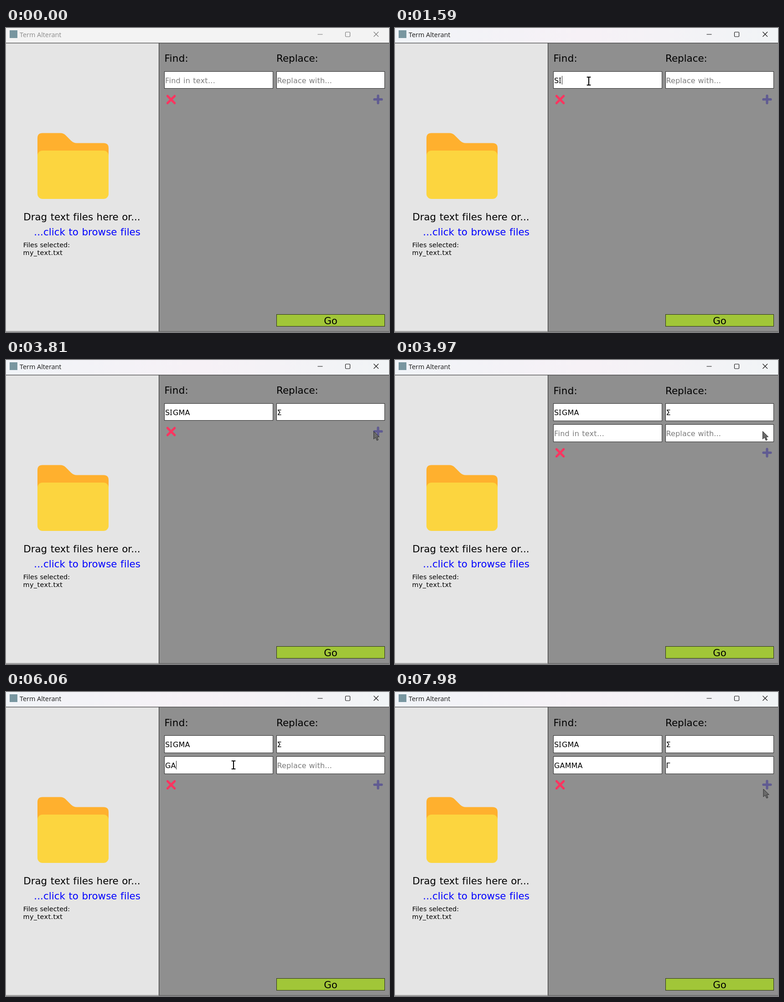
Write an HTML page that moves like this. It is 840 by 667 pixels and loops after 8000 ms.

```html
<!DOCTYPE html>
<html lang="en">
<head>
<meta charset="utf-8">
<title>Term Alterant</title>
<style>
  html, body { margin: 0; width: 100%; height: 100%; overflow: hidden; background: #8f8f8f; }
  svg { display: block; width: 100%; height: 100%; }
  text { font-family: "DejaVu Sans", Verdana, sans-serif; white-space: pre; font-variant-ligatures: none; }
  .big { font-size: 21.4px; word-spacing: .7px; }
  .small { font-size: 14.4px; word-spacing: .5px; }
  .field text { font-size: 16px; word-spacing: .55px; letter-spacing: .1px; }
  .field rect { fill: #fff; stroke: #2c2c2c; }
  .field .hint { fill: #7b7b7b; letter-spacing: .3px; }
  .field.right .hint { letter-spacing: .15px; }
  .serif { font-family: "Noto Sans", sans-serif; letter-spacing: 1.3px; }
  .caption { font: 14.4px "Open Sans", sans-serif; fill: #8a8a8a; }
  .controls { fill: none; stroke: #777; stroke-width: 1.1; }
  #tint { visibility: hidden; }
  .active #tint { visibility: visible; }
  .active .caption { fill: #181818; }
  .active .controls { stroke: #111; }
</style>
</head>
<body>
<svg id="app" viewBox="0 0 840 667" xmlns="http://www.w3.org/2000/svg">
  <defs>
    <linearGradient id="bar">
      <stop offset="0" stop-color="#f1f4f8"/>
      <stop offset=".5" stop-color="#f6f1f6"/>
      <stop offset="1" stop-color="#f1f4f6"/>
    </linearGradient>
  </defs>

  <!-- title bar -->
  <rect width="840" height="33" fill="#f3f3f3"/>
  <rect id="tint" width="840" height="33" fill="url(#bar)"/>
  <rect x="8" y="5" width="17" height="17" fill="#7896a0"/>
  <text class="caption" x="30" y="20">Term Alterant</text>
  <g class="controls">
    <path d="M683.5 14H694.5M806.5 8.500L817 19M817 8.500L806.5 19"/>
    <rect x="744.500" y="9" width="10" height="10" rx="1.500"/>
  </g>

  <!-- panels -->
  <rect y="33" width="335" height="634" fill="#e5e5e5"/>
  <rect x="336" y="33" width="504" height="634" fill="#8f8f8f"/>
  <path d="M0 33H840M335.5 33V666" stroke="#1c1c1c"/>
  <path d="M0 665.8H840" stroke="#555"/>

  <!-- file drop area -->
  <path fill="#ffb02e" d="M69 300V241.500Q69 230.500 80 230.500H119Q126 230.500 131 235.500L143 247.500Q148.500 252.500 155 252.500H214Q225 252.500 225 263.500V300Z"/>
  <rect x="69" y="269" width="156" height="106" rx="11" fill="#fcd53f"/>
  <text class="big" x="38.200" y="421.500">Drag text files here or...</text>
  <text class="big" x="295" y="454.500" text-anchor="end" fill="#00f" letter-spacing=".04">...click to browse files</text>
  <text class="small" x="37.800" y="481">Files selected:</text>
  <text class="small" x="37.500" y="498" letter-spacing=".4">my_text.txt</text>

  <!-- form -->
  <g id="heads">
    <text class="big" x="347.500" y="74.300" letter-spacing=".3">Find:</text>
    <text class="big" x="593" y="74.300">Replace:</text>
  </g>
  <g id="fields"></g>
  <g id="tools" fill="none" stroke-linecap="round">
    <path stroke="#fa3560" stroke-width="5" d="M354.300 149.200L369.900 164.800M369.900 149.200L354.300 164.800"/>
    <path stroke="#605b92" stroke-width="5.200" d="M808 156.700H824M816 148.700V164.700"/>
  </g>
  <rect x="593.500" y="628.500" width="237" height="26" fill="#a1c638" stroke="#2b3212"/>
  <text class="big" x="712" y="649.500" text-anchor="middle">Go</text>

  <rect id="caret" width="1" height="19" fill="#222"/>
  <path id="arrow" d="M0 0V17L4 13.300L7 20L10 18.700L7.200 12.200H12.300Z" fill="#6a6a6a" stroke="#2c2c2c"/>
  <path id="beam" d="M-4.300 -8.700H4.300M0 -8.700V8.700M-4.300 8.700H4.300" stroke="#000" stroke-width="2.100"/>
</svg>
<script>
const LOOP = 8000, ACTIVE_AT = 1110, ROW_AT = 3970;
const SVG = 'http://www.w3.org/2000/svg';
const $ = id => document.getElementById(id);

// Typed values by field: left and right of row one, then of row two.
const typed = [
  [[1590, 'SI'], [1750, 'SIGM'], [1910, 'SIGMA']],
  [[3170, 'Σ']],
  [[6060, 'GA'], [6220, 'GAMM'], [6380, 'GAMMA']],
  [[7500, 'Γ']]
];
// Field that shows the caret; -1 for none.
const carets = [
  [0, -1], [1110, 0], [2390, -1], [2860, 1], [3650, -1], [5250, 2],
  [5750, -1], [6060, 2], [6860, -1], [7180, 3], [7980, -1]
];
// Pointer steps: time, shape, x, y.
const pointer = [
  [0, '', 0, 0],
  [150, 'arrow', 190, 350], [310, 'arrow', 250, 285], [470, 'arrow', 320, 205],
  [630, 'beam', 392, 127], [790, 'beam', 420, 117], [950, 'beam', 425, 116.5],
  [2390, 'beam', 470, 115], [2550, 'beam', 597, 109], [2700, 'beam', 700, 106],
  [2860, 'beam', 718, 105.5], [3170, 'beam', 721, 106],
  [3490, 'beam', 752, 120], [3650, 'arrow', 794, 148], [3810, 'arrow', 806.5, 156.5],
  [4130, 'beam', 800, 160], [4290, 'beam', 730, 172], [4450, 'beam', 634, 176],
  [4610, 'beam', 584, 171], [4770, 'beam', 520, 163], [4930, 'beam', 499, 160],
  [6860, 'beam', 535, 160], [7020, 'beam', 640, 162], [7180, 'beam', 690, 162],
  [7660, 'beam', 745, 172], [7820, 'arrow', 799, 203], [7980, 'arrow', 808, 213]
];

const at = (track, t) => track.findLast(step => step[0] <= t);
const show = (el, on) => el.setAttribute('visibility', on ? 'visible' : 'hidden');
const move = (el, x, y) => el.setAttribute('transform', `translate(${x} ${y})`);

function add(parent, tag, attrs = {}) {
  const el = document.createElementNS(SVG, tag);
  for (const key in attrs) el.setAttribute(key, attrs[key]);
  return parent.appendChild(el);
}

const fields = typed.map((track, i) => {
  const right = i % 2, x = right ? 593.5 : 347.5, y = i < 2 ? 95.5 : 141.5;
  const textX = x + (right ? 1 : 1.6);
  const group = add($('fields'), 'g', { class: right ? 'field right' : 'field' });
  const box = add(group, 'rect', { x, y, width: right ? 237 : 238, height: 38 });
  const text = add(group, 'text', { x: textX, y: y + 25.5 });
  return { group, box, text, track, x: textX, y, right, value: null };
});

function setValue(field, value) {
  if (value === field.value) return;
  field.value = value;
  field.text.setAttribute('class', value ? '' : 'hint');
  field.text.innerHTML = value
    ? value.replace('I', '<tspan class="serif">I</tspan>')
    : field.right ? 'Replace with...' : 'Find in text...';
}

function render(t) {
  const grown = t >= ROW_AT;
  $('app').setAttribute('class', t >= ACTIVE_AT ? 'active' : '');
  move($('heads'), 0, grown ? 0.8 : 0);
  move($('tools'), 0, grown ? 46.6 : 0);

  fields.forEach((field, i) => {
    const step = at(field.track, t);
    setValue(field, step ? step[1] : '');
    show(field.group, i < 2 || grown);
    if (i < 2) {
      field.box.setAttribute('height', grown ? 38 : 37);
      field.text.setAttribute('y', field.y + (grown ? 25.5 : 25));
    }
  });

  const focus = fields[at(carets, t)[1]];
  show($('caret'), focus);
  if (focus) {
    const end = focus.value ? focus.text.getComputedTextLength() : 0;
    move($('caret'), Math.round(focus.x + end), focus.y + 9.5);
  }

  const [, shape, x, y] = at(pointer, t);
  for (const id of ['arrow', 'beam']) {
    show($(id), id === shape);
    move($(id), x, y);
  }
}

const start = performance.now();
function tick(now) {
  render(Math.max(0, now - start) % LOOP);
  requestAnimationFrame(tick);
}
render(0);
requestAnimationFrame(tick);
</script>
</body>
</html>
```
